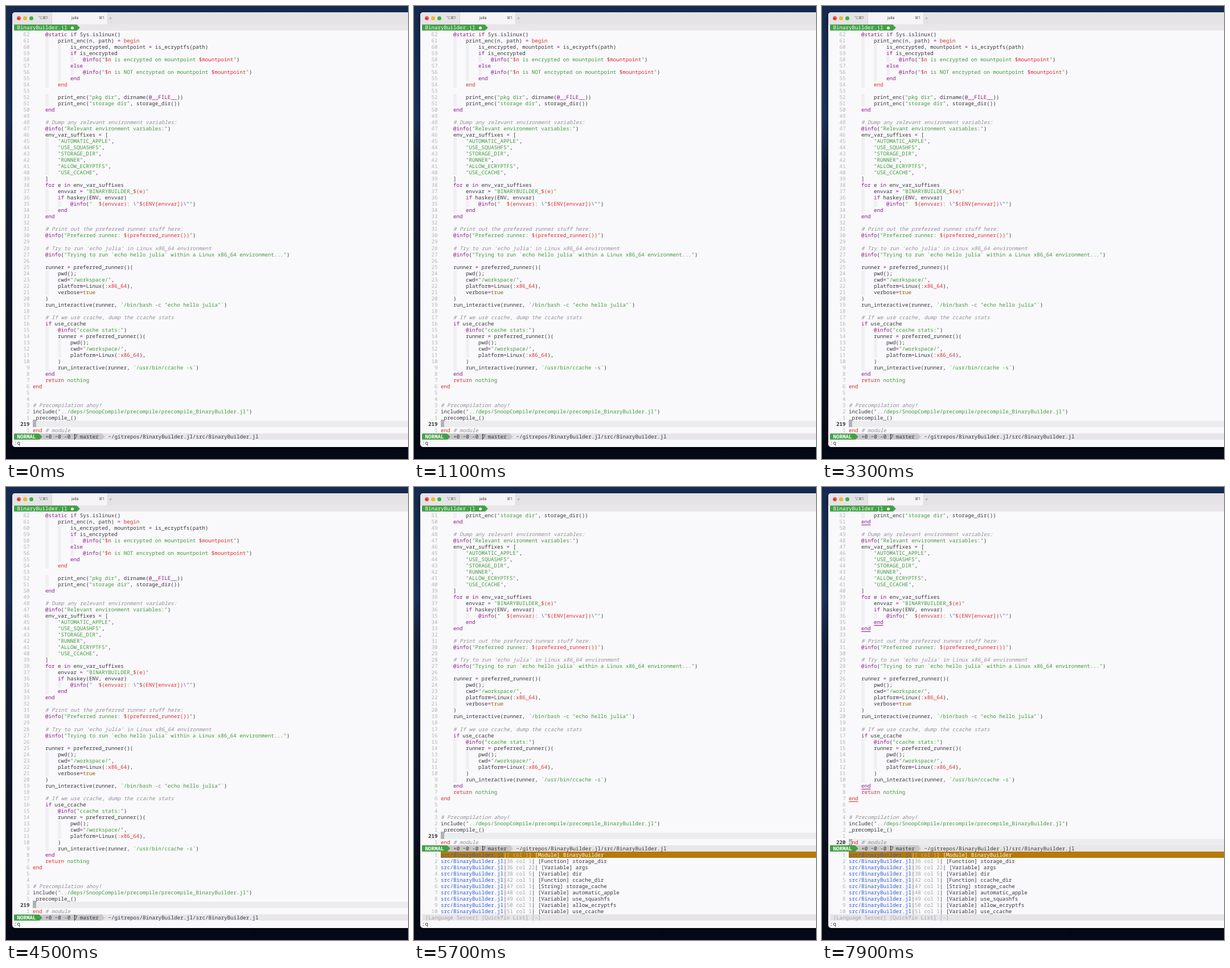
An HTML page that plays this animation: 706 px wide and 794 px high, repeating every 8000 ms.

```html
<!DOCTYPE html>
<html lang="en">
<head>
<meta charset="utf-8">
<title>Editor session</title>
<style>
html, body { margin: 0; width: 100%; height: 100%; overflow: hidden; }
body { position: relative; background: linear-gradient(#162b50, #1a325c 24%, #131f3a 36%, #0e182f 62%, #070c1a 92%, #050916); }
div, i, p { position: absolute; margin: 0; }
#win { left: 11px; top: 11px; width: 720px; height: 762px; border-radius: 5px; background: #f9f8fa; box-shadow: 0 3px 9px #0008; overflow: hidden; }
#bar { left: 0; top: 0; width: 720px; height: 21.5px; background: #e5e3e6; font: 6.5px/21px Inter, "DejaVu Sans", sans-serif; color: #555; }
#bar div { white-space: pre; }
#tab { left: 70px; width: 97px; height: 21.5px; background: #f6f4f7; box-shadow: 0 0 0 .5px #cfcdd0; }
#bar i { top: 7px; width: 7px; height: 7px; border-radius: 50%; }
#view { left: 0; top: 0; }
p { left: 14px; height: 11.03px; font: 9.19px/11.03px "Noto Sans Mono", "DejaVu Sans Mono", monospace; white-space: pre; color: #36383f; text-rendering: geometricPrecision; font-variant-ligatures: none; }
#view i { height: 11.03px; }
.arrow { clip-path: polygon(0 0, calc(100% - 5.5px) 0, 100% 50%, calc(100% - 5.5px) 100%, 0 100%); }
u { text-underline-offset: 1.5px; text-decoration-thickness: .8px; }
.num { color: #b3b3b8; }
.cur { color: #36383f; font-weight: 600; }
.com { color: #919298; font-style: italic; }
.str { color: #3f9c3c; }
.key { color: #8a1b90; }
.red { color: #da302f; }
.lit { color: #8d6100; }
.esc, .file { color: #2c5cd6; }
.dim { color: #a3a4aa; }
.inv { color: #fafafa; }
.mode { color: #fff; font-weight: 700; }
</style>
</head>
<body>
<div id="win"><div id="bar">
  <i style="left:7.5px;background:#ee5048"></i><i style="left:18.5px;background:#f5b52e"></i><i style="left:29.5px;background:#35b944"></i>
  <i style="left:10px;top:9.5px;width:2px;height:2px;background:#7c1510"></i>
  <div style="left:46px">⌥⌘1</div>
  <div id="tab"></div>
  <div style="left:104px;color:#333">julia</div>
  <div style="left:152px">⌘1</div>
  <div style="left:169px;font-size:11px;color:#aaa">+</div>
</div></div>
<div id="view"></div>
<script type="text/plain" id="code">
    @static if Sys.islinux()
        print_enc(n, path) = begin
            is_encrypted, mountpoint = is_ecryptfs(path)
            if is_encrypted
                @info("$n is encrypted on mountpoint $mountpoint")
            else
                @info("$n is NOT encrypted on mountpoint $mountpoint")
            end
        ~end

        print_enc("pkg dir", dirname(@__FILE__))
        print_enc("storage dir", storage_dir())
    end

    # Dump any relevant environment variables:
    @info("Relevant environment variables:")
    env_var_suffixes = [
        "AUTOMATIC_APPLE",
        "USE_SQUASHFS",
        "STORAGE_DIR",
        "RUNNER",
        "ALLOW_ECRYPTFS",
        "USE_CCACHE",
    ]
    for e in env_var_suffixes
        envvar = "BINARYBUILDER_$(e)"
        if haskey(ENV, envvar)
            @info("  $(envvar): \"$(ENV[envvar])\"")
        end
    end

    # Print out the preferred runner stuff here:
    @info("Preferred runner: $(preferred_runner())")

    # Try to run 'echo julia' in Linux x86_64 environment
    @info("Trying to run `echo hello julia` within a Linux x86_64 environment...")

    runner = preferred_runner()(
        pwd();
        cwd="/workspace/",
        platform=Linux(:x86_64),
        verbose=true
    )
    run_interactive(runner, `/bin/bash -c "echo hello julia"`)

    # If we use ccache, dump the ccache stats
    if use_ccache
        @info("ccache stats:")
        runner = preferred_runner()(
            pwd();
            cwd="/workspace/",
            platform=Linux(:x86_64),
        )
        run_interactive(runner, `/usr/bin/ccache -s`)
    end
    return nothing
~end


# Precompilation ahoy!
include("../deps/SnoopCompile/precompile/precompile_BinaryBuilder.jl")
_precompile_()

~end # module
</script>
<script>
const LOOP = 8000, SPLIT = 5700, MOVE = 7300;
const CW = 5.515, RH = 11.03, X0 = 14, Y0 = 43.5;
const lines = document.getElementById('code').textContent.slice(1).trimEnd().split('\n');
const symbols = `1 col 1|Module|BinaryBuilder
36 col 1|Function|storage_dir
36 col 22|Variable|args
38 col 5|Variable|dir
42 col 1|Function|ccache_dir
47 col 1|String|storage_cache
48 col 1|Variable|automatic_apple
49 col 1|Variable|use_squashfs
50 col 1|Variable|allow_ecryptfs
51 col 1|Variable|use_ccache`.split('\n').map(s => s.split('|'));
symbols[5][0] = '42 col 6'.replace('42', '47').replace('6', '1');

const span = (cls, s) => `<span class="${cls}">${s}</span>`;
const y = row => Y0 + RH * row;
const box = (col, row, cols, color, cls = '') =>
  `<i class="${cls}" style="left:${X0 + col * CW}px;top:${y(row)}px;width:${cols * CW}px;background:${color}"></i>`;
const text = (row, html, col = 0) => `<p style="top:${y(row)}px;left:${X0 + col * CW}px">${html}</p>`;
const gutter = (n, current) => span(current ? 'cur' : 'num', String(n).padStart(5)) + ' ';

const TOKENS = /(#.*)|("(?:\\.|[^"])*"|`[^`]*`)|(@\w+|\b(?:if|else|end|for|in)\b|=)|(~end|begin|return|:x86_64)|(true)|(nothing)/g;
const quoted = s => span('str', s.replace(/\$\([^)]*\)+|\$\w+|(\\")/g, (m, esc) => span(esc ? 'esc' : 'red', m)));
const paint = line => line.replace(TOKENS, (m, com, str, key, red, lit) =>
  str ? quoted(m) : span(com ? 'com' : key ? 'key' : red ? 'red' : lit ? 'lit' : 'str', m.replace('~', '')));

function statusLine(row) {
  const hook = `<i style="left:119.5px;top:${y(row) + .7}px;width:1.2px;height:9.6px;background:#222"></i>`;
  return box(0, row, 130, '#e8e6e9') + box(0, row, 29, '#c9c7ca', 'arrow') + box(0, row, 9, '#43a047', 'arrow') + hook
    + text(row, span('mode', 'NORMAL'), 1) + text(row, '+0 ~0 -0', 10) + text(row, '7', 19.2)
    + text(row, 'master', 21) + text(row, '~/gitrepos/BinaryBuilder.jl/src/BinaryBuilder.jl', 30);
}

function buffer(first, cursor, marked) {
  let out = box(6, cursor - first, 124, '#ecebed');
  lines.slice(first).forEach((line, row) => {
    const at = row + first, current = at === cursor;
    const indent = line.search(/\S/);
    for (let c = 4; c < indent; c += 4) out += box(6 + c, row, 1, '#f0eff2');
    if (current) out += box(6, row, 1, '#b2b1b4');
    let html = paint(line);
    if (marked) html = html.replace('>end<', current ? `><u>${span('inv', 'e')}nd</u><` : '><u>end</u><');
    out += text(row, gutter(current ? 157 + at : Math.abs(cursor - at), current) + html);
  });
  return out + statusLine(lines.length - first);
}

function quickfix(top) {
  const list = symbols.map(([pos, kind, name], k) => {
    const html = gutter(k + 1) + span('file', 'src/BinaryBuilder.jl') + '|' + span(k ? 'dim' : 'num', pos) + `| [${kind}] ${name}`;
    return (k ? '' : box(6, top, 124, '#b57a08')) + text(top + k, k ? html : span('inv', html));
  }).join('');
  const end = top + symbols.length;
  return list + box(0, end, 130, '#e6e4e7') + text(end, span('dim', '[Language Server] [Quickfix List] [-]'), 1);
}

const frame = box(0, -1, 130, '#e8e6e9') + box(0, -1, 21, '#43a047', 'arrow')
  + text(-1, span('inv', 'BinaryBuilder.jl'), 1)
  + '<i style="left:113.5px;top:35.5px;width:5px;height:5px;border-radius:50%;background:#fff"></i>'
  + text(65, ':q');
const scenes = [
  frame + buffer(0, 62, false),
  frame + buffer(11, 62, false) + quickfix(54),
  frame + buffer(11, 63, true) + quickfix(54)
];

const view = document.getElementById('view');
let shown = -1;
function tick() {
  const t = performance.now() % LOOP;
  const scene = t < SPLIT ? 0 : t < MOVE ? 1 : 2;
  if (scene !== shown) view.innerHTML = scenes[shown = scene];
  requestAnimationFrame(tick);
}
tick();
</script>
</body>
</html>
```
